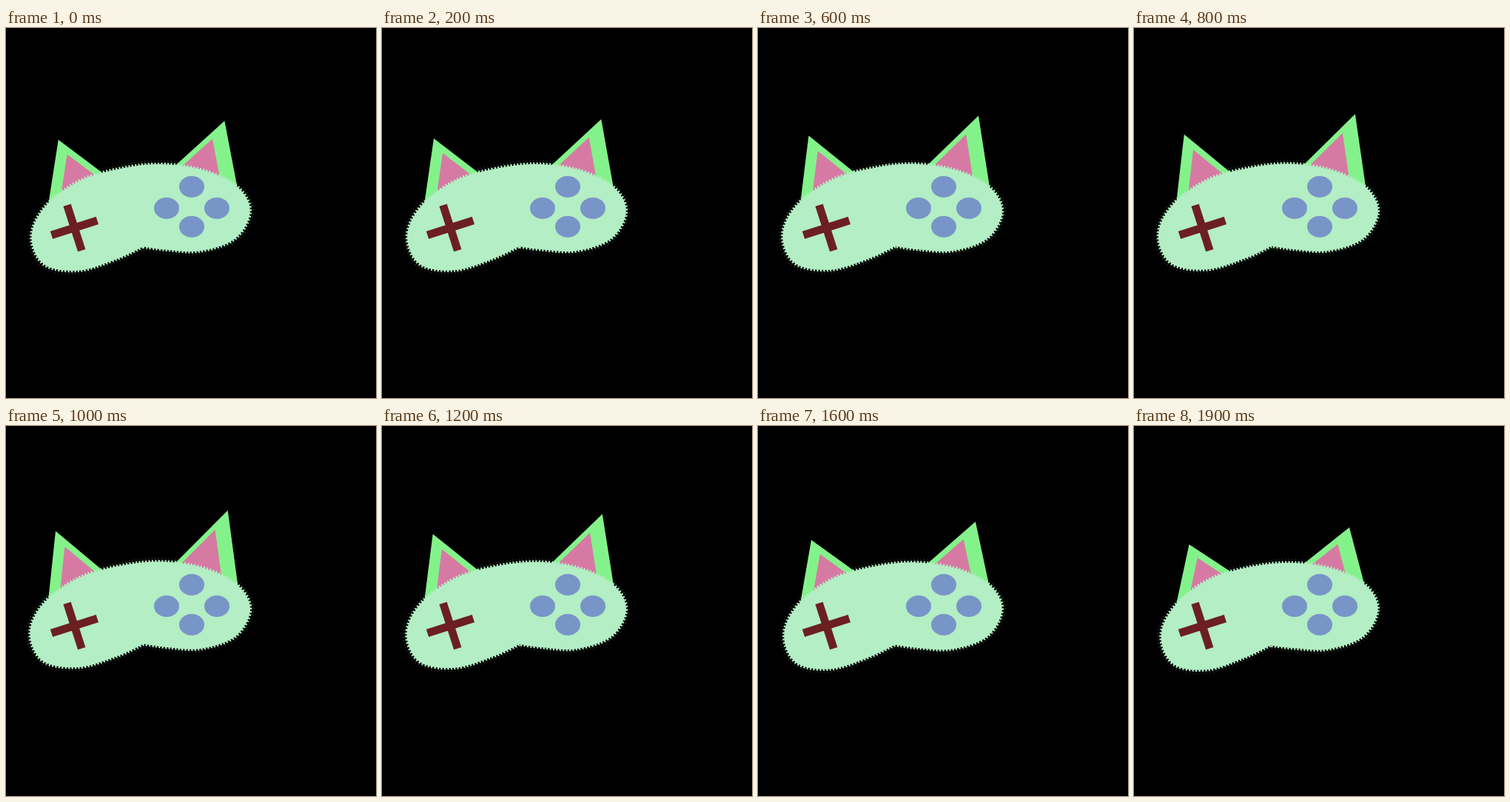
An HTML page that plays this animation: 500 by 500 pixels, repeating every 2000 ms.

```html
<!DOCTYPE html>
<html lang="en">
<head>
<meta charset="utf-8">
<title>Cat controller</title>
<style>
html, body { margin: 0; width: 100%; height: 100%; overflow: hidden; background: #000; }
svg { display: block; width: 100%; height: 100%; }
ellipse { rx: 17px; ry: 14.5px; fill: #7895c8; }
.body { stroke: #b3eec4; }
</style>
</head>
<body>
<svg viewBox="0 0 500 500">
  <path class="body" fill="none" stroke-width="11" stroke-dasharray="1 3.4" opacity=".2"/>
  <g id="ears"></g>
  <path class="body" fill="#b3eec4" stroke-width="4.4" stroke-dasharray="2.2 2.2"/>
  <path d="M-32.5 0H32.5M0-32.2V32.2" transform="translate(92.4 270) rotate(-17.8)"
        stroke="#6c1f20" stroke-width="10.8"/>
  <ellipse cx="251" cy="214.5"/>
  <ellipse cx="217" cy="243.5"/>
  <ellipse cx="285" cy="243.5"/>
  <ellipse cx="251" cy="268.5"/>
</svg>
<script>
const LOOP = 2000, STEP = 100, TURN = 10;

// Only the tip moves, from high to low; inner ears lean towards the hub
const EARS = [
  { high: [67, 142], low: [74.5, 160], base: [[140, 203], [56, 246]], hub: [150, 282] },
  { high: [299.7, 114], low: [291, 137], base: [[315, 228], [222, 192]], hub: [186, 287] }
];

// Key points of the body, from the notch round to the notch
const OUTLINE = [
  [186, 294.5], [150, 311], [98, 326], [50, 317.5], [32.5, 280], [51.5, 239],
  [100, 204.5], [160, 188], [215, 183.5], [270, 193], [314, 216], [330, 249],
  [309, 285], [262, 301], [218, 299], [186, 294.5]
];

const mix = (a, b, u) => a.map((v, k) => v + (b[k] - v) * u);

function addEar(fill) {
  const el = document.createElementNS('http://www.w3.org/2000/svg', 'polygon');
  el.setAttribute('fill', fill);
  document.getElementById('ears').append(el);
  return el;
}
for (const ear of EARS) {
  ear.outer = addEar('#84f28a');
  ear.inner = addEar('#d67aa4');
}
const bodies = document.querySelectorAll('.body');

// The left lobe sags while the right one stays in place
function sag([x, y], u) {
  const k = u * (1 - x / 300);
  return [x + 4.5 * k * Math.cos((x - 30) / 155 * Math.PI), y + 5 * k];
}

function spline(p) {
  let d = `M${p[0]}`;
  for (let i = 0; i < p.length - 1; i++) {
    const a = p[i], b = p[i + 1], before = p[i - 1] || a, after = p[i + 2] || b;
    const c1 = a.map((v, k) => v + (b[k] - before[k]) / 6);
    const c2 = b.map((v, k) => v - (after[k] - a[k]) / 6);
    d += `C${c1} ${c2} ${b}`;
  }
  return d + 'Z';
}

function drawEar({ high, low, base, hub, outer, inner }, u) {
  const tip = mix(high, low, u);
  const innerTip = mix(tip, hub, 0.15);
  const innerBase = base.map(b => b.map((v, k) => innerTip[k] + 0.72 * (v - tip[k])));
  outer.setAttribute('points', [tip, ...base].join(' '));
  inner.setAttribute('points', [innerTip, ...innerBase].join(' '));
}

function draw(ms) {
  const i = Math.floor((ms % LOOP) / STEP);
  const u = i <= TURN ? 0.5 * (1 - i / TURN) : (i - TURN) / 9;
  EARS.forEach(ear => drawEar(ear, u));
  const d = spline(OUTLINE.map(p => sag(p, u)));
  bodies.forEach(el => el.setAttribute('d', d));
}

function tick() {
  draw(performance.now());
  requestAnimationFrame(tick);
}
tick();
</script>
</body>
</html>
```
